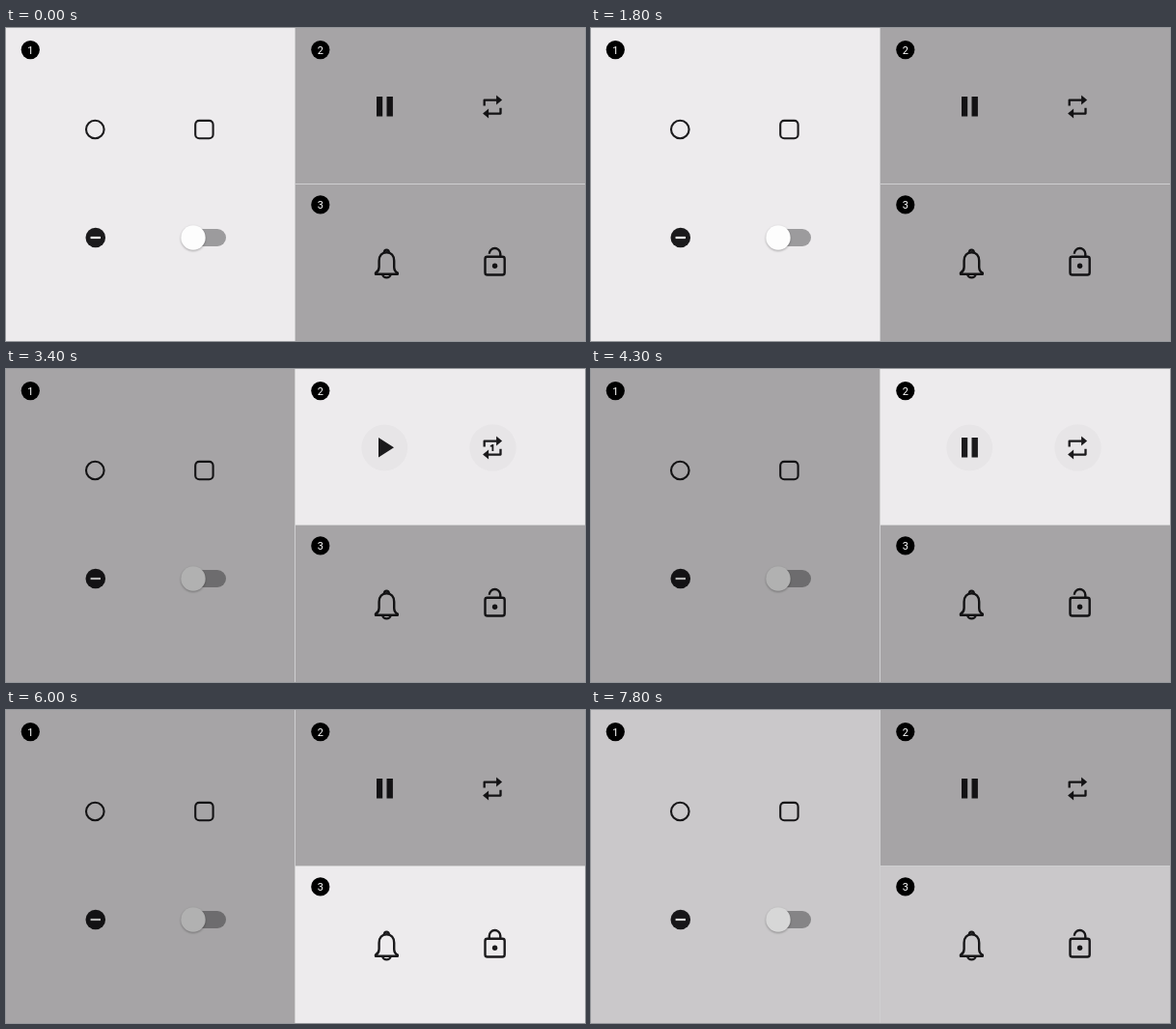
Write an HTML page that moves like this. It is 600 px wide and 324 px high and loops after 7.9 s.

```html
<!DOCTYPE html>
<html lang="en">
<head>
<meta charset="utf-8">
<title>Icon toggles</title>
<style>
  html, body { margin: 0; width: 100%; height: 100%; overflow: hidden; background: #edebed; }
  svg { display: block; width: 100vw; height: 100vh; }
  .line { fill: none; stroke: #1b1a1c; stroke-linejoin: round; }
  .ink { fill: #1b1a1c; }
  .shade { fill: #000; }
  .ripple { fill: #000; stroke: none; opacity: 0; transform-box: fill-box; transform-origin: center; }
  .badge text { fill: #fff; font: 400 11px Roboto, Arial, sans-serif; text-anchor: middle; }
  .knob { filter: drop-shadow(0 1px 1.2px rgba(0, 0, 0, .3)); }
</style>
</head>
<body>
<svg viewBox="0 0 600 324">
  <rect width="600" height="324" fill="#edebed"/>

  <!-- selection controls -->
  <g class="line" stroke-width="2.1">
    <circle class="ripple r1" cx="92.5" cy="105" r="23.5"/>
    <circle class="ripple r1" cx="205.5" cy="105" r="23.5"/>
    <circle class="ripple r1" cx="92.8" cy="217" r="23.5"/>
    <circle cx="92.3" cy="105" r="9.3"/>
    <circle id="dot" class="ink" cx="92.3" cy="105" stroke="none"/>
    <rect x="196.2" y="95.9" width="18.4" height="18.4" rx="4"/>
    <rect id="box" class="ink" x="196.2" y="95.9" width="18.4" height="18.4" rx="4"/>
    <path id="check" d="M200.3 105.4l3.7 3.7 7-7.4" style="stroke: #fff" pathLength="1" stroke-dasharray="1 2"/>
  </g>
  <circle class="ink" cx="92.8" cy="217" r="10.3"/>
  <rect x="87.6" y="215.9" width="10.4" height="2.2" fill="#fff"/>
  <rect id="plus" x="91.7" width="2.2" fill="#fff"/>
  <rect x="184" y="208" width="44" height="18" rx="9" fill="#9c9b9d"/>
  <g id="thumb">
    <circle class="ripple r1" cx="194" cy="217" r="24"/>
    <circle class="knob" cx="194" cy="217" r="12.7" fill="#fdfdfd"/>
    <circle id="knobOn" class="ink" cx="194" cy="217" r="12.7"/>
  </g>

  <!-- simple icons -->
  <circle class="ripple r2" cx="392.3" cy="81.5" r="24"/>
  <circle class="ripple r2" cx="504.5" cy="81.5" r="24.3"/>
  <path id="pause" class="ink" d="M384 71h6.2v20.4H384zM394.5 71h6.4v20.4h-6.4z"/>
  <path id="play" class="ink" d="M386 71v20.5l16-10.25z"/>
  <g transform="translate(504.1 81.6)">
    <g id="arrow">
      <path class="line" stroke-width="2.3" stroke-linejoin="miter" d="M-8.4-1.2V-7H4.5"/>
      <path class="ink" d="M4-12l6 5-6 5z"/>
    </g>
    <use href="#arrow" transform="rotate(180)"/>
    <path id="one" class="ink" d="M1.2 3.5v-7H0l-2.3 1.2v1.1h1.7v4.7z"/>
  </g>

  <!-- detailed icons -->
  <circle class="ripple r3" cx="394.8" cy="243.5" r="24"/>
  <circle class="ripple r3" cx="506.8" cy="243.5" r="24"/>
  <g class="line" stroke-width="2.4">
    <g id="bell">
      <path d="M383 254.8v-1.2c2.6-1.6 3.6-3.2 3.6-6.2V241c0-5.4 3.2-8.8 7.8-8.8s7.8 3.4 7.8 8.8v6.4c0 3 1 4.6 3.6 6.2v1.2z"/>
      <path d="M392 232.2a2.4 2.6 0 0 1 4.8 0M390.3 255a4.1 3.4 0 0 0 8.2 0"/>
    </g>
    <rect x="496.5" y="236.7" width="20.2" height="18.8" rx="2.2"/>
    <path id="shackle"/>
  </g>
  <circle class="ink" cx="506.6" cy="246.3" r="2.7"/>

  <rect class="shade" width="299" height="324"/>
  <rect class="shade" x="300" width="300" height="161"/>
  <rect class="shade" x="300" y="162" width="300" height="162"/>
  <path d="M299 0h1v324h-1zM300 161h300v1H300z" fill="#c9c8ca" opacity=".8"/>

  <g class="badge">
    <circle cx="25.3" cy="22.6" r="9.6"/><text x="25.3" y="26.5">1</text>
    <circle cx="325.8" cy="22.6" r="9.6"/><text x="325.8" y="26.5">2</text>
    <circle cx="325.8" cy="182.9" r="9.6"/><text x="325.8" y="186.8">3</text>
  </g>
</svg>
<script>
  const LOOP = 7900, STEP = 100, FADE = 170;
  const PANEL_TIMES = [2460, 5000, 7715];
  const $ = id => document.getElementById(id);
  const shades = document.querySelectorAll('.shade');

  const ramp = (t, start, length) => Math.min(1, Math.max(0, (t - start) / length));
  const toggled = (t, on, off, length) => ramp(t, on, length) - ramp(t, off, length);

  // Time since the latest of two taps; negative before the first.
  const sinceTap = (t, first, second) => t - (t < second - STEP ? first : second);

  function ripple(name, since, life, rest = 0) {
    const alpha = .09 * ramp(since, -STEP, 2 * STEP) * (1 - ramp(since, STEP, life - STEP));
    const scale = .65 + .35 * ramp(since, 0, 2 * STEP);
    document.querySelectorAll('.' + name).forEach(el => {
      el.style.opacity = Math.max(alpha, rest);
      el.style.transform = `scale(${scale})`;
    });
  }

  function drawShades(t) {
    const [second, third, first] = PANEL_TIMES.map(start => ramp(t, start, FADE));
    const lit = [1 - second + first, second - third, third - first];
    lit.forEach((v, i) => shades[i].style.opacity = .3 * (1 - v));
  }

  function drawControls(t) {
    const on = toggled(t, 440, 1240, 200);
    ripple('r1', sinceTap(t, 500, 1300), 500);
    $('dot').setAttribute('r', 5.2 * on);
    $('box').style.opacity = $('check').style.opacity = $('knobOn').style.opacity = on;
    $('check').style.strokeDashoffset = 1 - on;
    $('plus').setAttribute('y', 217 - 5.2 * on);
    $('plus').setAttribute('height', 10.4 * on);
    $('thumb').setAttribute('transform', `translate(${21 * on})`);
  }

  function drawSimple(t) {
    const on = toggled(t, 3100, 4000, 200);
    const rest = .025 * toggled(t, 3200, 5000, STEP);
    ripple('r2', sinceTap(t, 3200, 4100), 200, rest);
    $('pause').style.opacity = 1 - on;
    $('play').style.opacity = $('one').style.opacity = on;
  }

  function drawDetailed(t) {
    const closed = toggled(t, 5500, 6700, 300);
    const since = sinceTap(t, 5600, 6800);
    const swing = since < 0 ? 0 : 12 * Math.cos(Math.PI * since / 100) * (1 - ramp(since, 0, 400));
    ripple('r3', since, 400);
    $('bell').setAttribute('transform', `rotate(${swing} 394.4 230)`);
    $('shackle').setAttribute('d', `M500.8 ${233.8 + 3 * closed}V233.8a5.75 5.75 0 0 1 11.5 0v3`);
  }

  function draw(now) {
    const t = Math.floor(now % LOOP / STEP) * STEP;
    drawShades(t);
    drawControls(t);
    drawSimple(t);
    drawDetailed(t);
  }

  let start;
  function tick(now) {
    start ??= now;
    draw(now - start);
    requestAnimationFrame(tick);
  }
  draw(0);
  requestAnimationFrame(tick);
</script>
</body>
</html>
```
